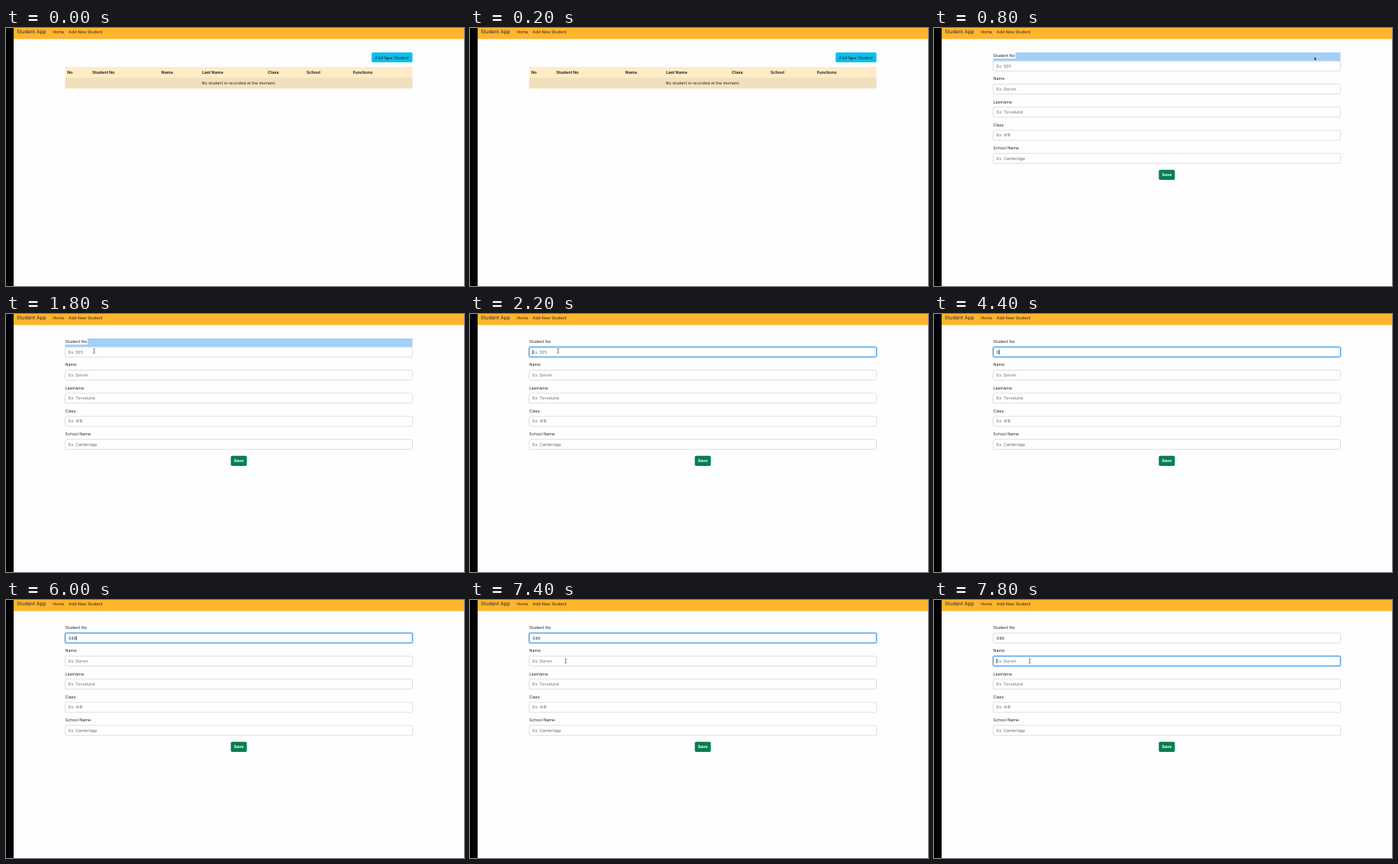
Recreate the animation shown at these times as an HTML page. Size 600x338 px, loop 8 s.

```html
<!DOCTYPE html>
<html lang="en">
<head>
<meta charset="utf-8">
<title>Student App</title>
<style>
  html, body { margin: 0; width: 100%; height: 100%; overflow: hidden; background: #fefdff; }
  svg { display: block; width: 100vw; height: 100vh; }
  text { font: 5.35px Inter, Roboto, sans-serif; fill: #24262a; text-rendering: geometricPrecision; white-space: pre; }
  .brand { font-size: 6.55px; }
  .bold { font-weight: 700; }
  .hint { fill: #5f656b; }
  .mid { text-anchor: middle; }
</style>
</head>
<body>
<svg viewBox="0 0 600 338">
  <rect width="600" height="338" fill="#fefdff"/>
  <rect x="10" width="590" height="14.5" fill="#ffb52e"/>
  <rect width="10" height="338"/>
  <text class="brand" x="14" y="7.4">Student App</text>
  <text x="61.2" y="7.2">Home</text>
  <text x="82" y="7.2">Add New Student</text>

  <g id="list">
    <rect x="479" y="32" width="53.5" height="13" rx="2" fill="#08c0ec"/>
    <text class="mid" x="505.7" y="40.6">Add New Student</text>
    <rect x="77.5" y="51" width="455" height="14" fill="#ffecc6"/>
    <rect x="77.5" y="65" width="455" height="14.3" fill="#f1e0bc"/>
    <text class="mid" x="305" y="74.2">No student is recorded at the moment.</text>
  </g>

  <g id="form">
    <path id="selection" fill="#a3d0f9" d="M106.7 32H532.5V43.5H77.5V40H106.7Z"/>
    <g id="fields"></g>
    <rect x="294.5" y="185.8" width="21" height="13.3" rx="1.8" fill="#087f4f"/>
    <text class="mid bold" x="305" y="194.4" style="fill:#fff">Save</text>
  </g>

  <rect id="caret" width=".7" height="6.4" fill="#222"/>
  <path id="arrow" d="M0 0V4.6L1 3.8L1.7 5.3L2.4 5L1.7 3.5H3Z" fill="#111" stroke="#fff" stroke-width=".25"/>
  <path id="beam" d="M-1.1-3Q0-3 0-2.3Q0-3 1.1-3M0-2.3V2.3M-1.1 3Q0 3 0 2.3Q0 3 1.1 3" fill="none" stroke="#333" stroke-width=".65"/>
</svg>
<script>
const LOOP = 8000, STEP = 200;
const FIELD_TOP = 43.3, FIELD_HEIGHT = 13, FIELD_PITCH = 30.25, TEXT_X = 82;
const $ = id => document.getElementById(id);

const columns = [["No", 80.3], ["Student No", 113], ["Name", 203.6], ["Last Name", 257],
  ["Class", 343], ["School", 393.8], ["Functions", 454.4]];
$("list").innerHTML += columns.map(([name, x]) =>
  `<text class="bold" x="${x}" y="59.8">${name}</text>`).join("");

const fields = [["Student No", "505"], ["Name", "Dorvin"], ["Lastname", "Torvelund"],
  ["Class", "4/B"], ["School Name", "Cambridge"]];
$("fields").innerHTML = fields.map(([label, example], i) => {
  const y = FIELD_TOP + i * FIELD_PITCH;
  const box = `x="77.5" y="${y}" width="455" height="${FIELD_HEIGHT}" rx="1.8"`;
  return `<text x="77.5" y="${y - 5.2}">${label}</text>
    <rect ${box} fill="#fff" stroke="#ced2d8" stroke-width=".7"/>
    <g class="ring" fill="none">
      <rect ${box} stroke="#b9dbfb" stroke-width="2.6"/>
      <rect ${box} stroke="#58a6ee" stroke-width="1"/>
    </g>
    <text class="value hint" x="${TEXT_X}" y="${y + 8.3}">Ex: ${example}</text>`;
}).join("");
const rings = document.querySelectorAll(".ring");
const studentNo = document.querySelector(".value");

const show = (element, visible) => element.style.display = visible ? "" : "none";
const within = (t, from, to) => t >= from && t < to;
const place = (element, x, y) => element.setAttribute("transform", `translate(${x} ${y})`);

// Eased progress of t between two times
const ease = (t, from, to) => {
  const p = Math.min(1, Math.max(0, (t - from) / (to - from)));
  return p * p * (3 - 2 * p);
};
const mix = (a, b, p) => a + (b - a) * p;

function drawPointer(t) {
  const toNumber = ease(t, 800, 1800), toName = ease(t, 6200, 7400);
  const x = mix(mix(498.4, 115.4, toNumber), 125.4, toName);
  const y = mix(mix(37.6, 48.4, toNumber), 80, toName);
  const offset = y - FIELD_TOP;
  const overField = offset >= 0 && offset % FIELD_PITCH <= FIELD_HEIGHT;
  const visible = !within(t, 4400, 6400);
  show($("arrow"), visible && !overField);
  show($("beam"), visible && overField);
  place($("arrow"), x, y);
  place($("beam"), x, y);
}

function drawCaret(t, typed) {
  const on = [[2200, 2600], [3000, 3600], [4000, 5600], [6000, 6400], [7000, 7400], [7800, LOOP]]
    .some(([from, to]) => within(t, from, to));
  const row = t >= 7600 ? 1 : 0;
  const advance = typed && !row ? studentNo.getComputedTextLength() : 0;
  show($("caret"), on);
  place($("caret"), TEXT_X - .3 + advance, FIELD_TOP + row * FIELD_PITCH + 3.3);
}

function draw(time) {
  const t = Math.floor(time % LOOP / STEP) * STEP;
  show($("list"), t < 800);
  show($("form"), t >= 800);
  show($("selection"), t < 2000);

  const typed = "048".slice(0, [4400, 5000, 6000].filter(key => t >= key).length);
  studentNo.textContent = typed || "Ex: " + fields[0][1];
  studentNo.classList.toggle("hint", !typed);

  const focus = [
    within(t, 2000, 7600) ? (t < 2200 ? .7 : 1) : t === 7600 ? .3 : 0,
    t >= 7600 ? (t < 7800 ? .7 : 1) : 0
  ];
  rings.forEach((ring, i) => ring.style.opacity = focus[i] || 0);

  drawCaret(t, typed);
  drawPointer(t);
}

const start = performance.now();
function tick() {
  draw(performance.now() - start);
  requestAnimationFrame(tick);
}
tick();
</script>
</body>
</html>
```
